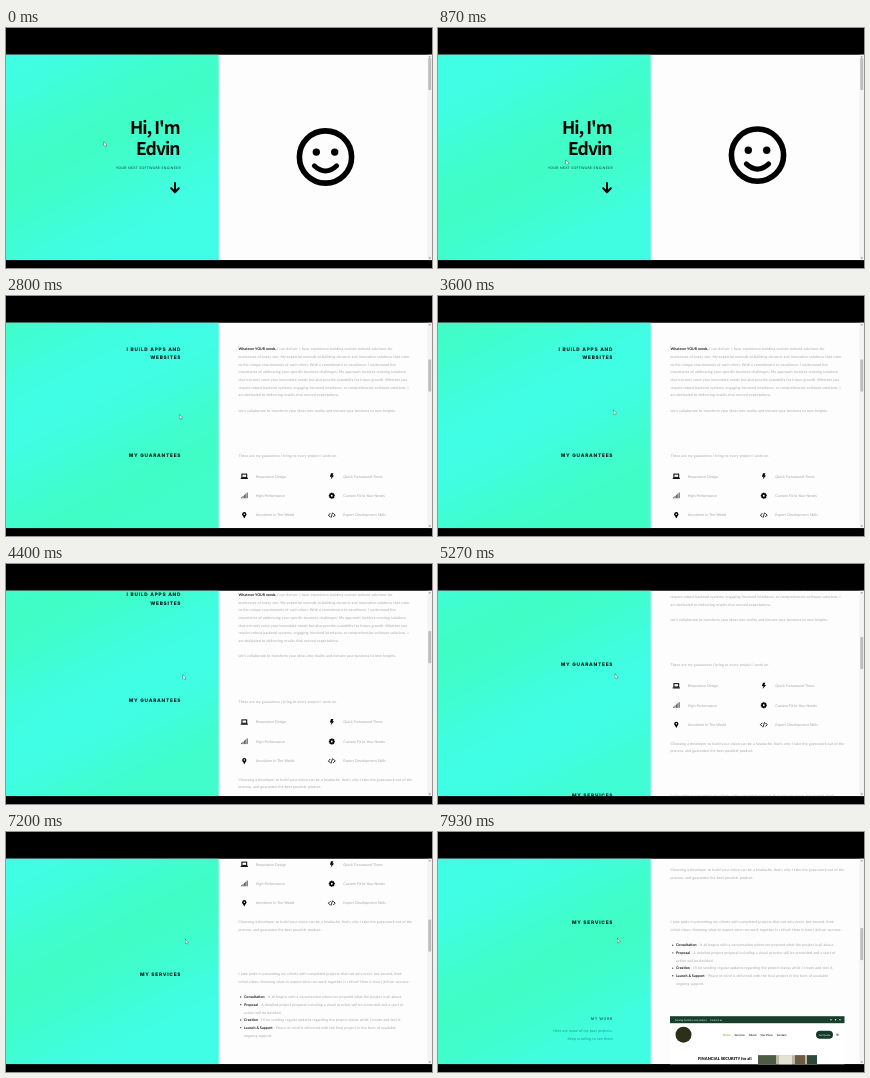
An HTML page with a canvas that plays this animation: 426 by 240 pixels, repeating every 8 s.

```html
<!DOCTYPE html>
<html lang="en">
<head>
<meta charset="utf-8">
<title>Portfolio scroll</title>
<style>
  html, body { margin: 0; width: 100%; height: 100%; overflow: hidden; background: #000; }
  canvas { display: block; width: 426px; height: 240px; }
</style>
</head>
<body>
<canvas id="stage"></canvas>
<script>
const W = 426, H = 240, LOOP = 8000;
const TOP = 26.5, BOTTOM = 232.2, PAGE = BOTTOM - TOP, SPLIT = 212.7;
const NOTCH = 22.2;
const TITLE = '"Noto Sans CJK JP", "Noto Sans CJK SC", "Noto Sans CJK", "Open Sans", sans-serif';
const HEAD = 'Inter, sans-serif';
const BODY = 'Lato, sans-serif';
const INK = '#000', GREY = '#a6a6ac', PAPER = '#fdfdfd';

const canvas = document.getElementById('stage');
const ctx = canvas.getContext('2d');
const ratio = window.devicePixelRatio || 1;
canvas.width = W * ratio;
canvas.height = H * ratio;

const clamp = v => Math.min(1, Math.max(0, v));
const progress = (t, start, length) => clamp((t - start) / length);
const easeOut = p => 1 - (1 - p) * (1 - p);
const smooth = p => p * p * (3 - 2 * p);

// Start times of the wheel notches.
const wheel = [3900, 4800, 5200, 5700, 6430, 6800, 7125, 7390, 7650];

function scrollAt(t) {
  const jump = smooth(progress(t, 1900, 750)) * PAGE;
  return wheel.reduce((sum, start) => sum + NOTCH * easeOut(progress(t, start, 180)), jump);
}

// Time, x, y of the pointer.
const pointerPath = [
  [0, 98, 114], [400, 98, 114], [1450, 168.5, 157], [2000, 168.5, 157],
  [2700, 173.5, 119], [4300, 177, 111], [6130, 177.5, 109.5], [7200, 179.5, 107.5], [8000, 179.5, 106.5]
];

function pointerAt(t) {
  const i = pointerPath.findIndex(k => k[0] > t);
  const [t0, x0, y0] = pointerPath[i - 1], [t1, x1, y1] = pointerPath[i];
  const p = smooth((t - t0) / (t1 - t0));
  return [x0 + (x1 - x0) * p, y0 + (y1 - y0) * p];
}

// Writes text centred vertically on y and returns its width.
function write(str, x, y, size, { font = BODY, weight = 400, color = GREY, align = 'left', gap = 0 } = {}) {
  ctx.font = `${weight} ${size}px ${font}`;
  ctx.letterSpacing = gap + 'px';
  ctx.textRendering = 'geometricPrecision';
  ctx.textAlign = align;
  ctx.fillStyle = color;
  ctx.fillText(str, align === 'right' ? x + gap : x, y + size * 0.35);
  return ctx.measureText(str).width;
}

function box(x, y, w, h, color) {
  ctx.fillStyle = color;
  ctx.fillRect(x, y, w, h);
}

function disc(x, y, r, color) {
  ctx.fillStyle = color;
  ctx.beginPath();
  ctx.arc(x, y, r, 0, Math.PI * 2);
  ctx.fill();
}

function line(points, width, color = INK) {
  ctx.strokeStyle = color;
  ctx.lineWidth = width;
  ctx.lineCap = ctx.lineJoin = 'round';
  ctx.beginPath();
  points.forEach(([x, y]) => ctx.lineTo(x, y));
  ctx.stroke();
}

function shape(points, color = INK) {
  ctx.fillStyle = color;
  ctx.beginPath();
  points.forEach(([x, y]) => ctx.lineTo(x, y));
  ctx.fill();
}

function at(x, y, draw) {
  ctx.save();
  ctx.translate(x, y);
  draw();
  ctx.restore();
}

function panels(t) {
  const wash = ctx.createLinearGradient(0, TOP, SPLIT * 0.5, BOTTOM);
  for (let i = 0; i <= 8; i++) {
    const k = Math.cos(Math.PI * 2 * (i / 8 - t / 7000));
    wash.addColorStop(i / 8, `rgb(64, 253, ${Math.round(214 + 16 * k)})`);
  }
  box(0, TOP, W, PAGE, PAPER);
  box(0, TOP, SPLIT, PAGE, wash);
}

function face(t) {
  at(319.5, 127 + 2 * Math.cos(t / 3600 * Math.PI * 2), () => {
    ctx.strokeStyle = INK;
    ctx.lineCap = 'round';
    ctx.lineWidth = 5.6;
    ctx.beginPath();
    ctx.arc(0, 0, 26.1, 0, Math.PI * 2);
    ctx.stroke();
    disc(-9.2, -4.9, 3.7, INK);
    disc(9.2, -4.9, 3.7, INK);
    ctx.lineWidth = 4.9;
    ctx.beginPath();
    ctx.moveTo(-11.2, 8.8);
    ctx.quadraticCurveTo(0, 19.2, 11.2, 8.8);
    ctx.stroke();
  });
}

function hero(t) {
  const style = { font: TITLE, weight: 700, color: INK, align: 'right', gap: -1 };
  write("Hi, I'm", 174.5, 99.6, 17.5, style);
  write('Edvin', 174.5, 120.6, 17.5, style);
  write('YOUR NEXT SOFTWARE ENGINEER', 174.5, 140, 3.4, { color: '#123a35', align: 'right', gap: 0.35 });
  line([[169, 155], [169, 164]], 2);
  line([[165.2, 160.3], [169, 164.2], [172.8, 160.3]], 2);
  face(t);
}

const icons = {
  laptop() {
    ctx.strokeStyle = INK;
    ctx.lineWidth = 1;
    ctx.strokeRect(-2.4, -2.2, 4.8, 3.3);
    box(-3.6, 1.5, 7.2, 1.1, INK);
  },
  bolt() {
    shape([[-0.8, -3], [1.6, -3], [0.7, -0.8], [2.3, -0.8], [-1.1, 3.2], [-0.3, 0.4], [-1.9, 0.4]]);
  },
  bars() {
    for (let i = 0; i < 5; i++) box(-3.2 + i * 1.4, 2.6 - (i + 1) * 1.15, 1, (i + 1) * 1.15, '#55555a');
  },
  gear() {
    for (let i = 0; i < 4; i++) {
      ctx.rotate(Math.PI / 4);
      box(-0.8, -3, 1.6, 6, INK);
    }
    disc(0, 0, 2.3, INK);
    disc(0, 0, 0.95, PAPER);
  },
  pin() {
    disc(0, -0.9, 2.1, INK);
    shape([[-2, -0.4], [2, -0.4], [0, 3.3]]);
    disc(0, -0.9, 0.75, PAPER);
  },
  code() {
    line([[-1.8, -1.6], [-3.4, 0], [-1.8, 1.6]], 0.9);
    line([[1.8, -1.6], [3.4, 0], [1.8, 1.6]], 0.9);
    line([[0.7, -2.3], [-0.7, 2.3]], 0.8);
  }
};

const perks = [
  ['laptop', 'Responsive Design'], ['bolt', 'Quick Turnaround Times'],
  ['bars', 'High Performance'], ['gear', 'Custom Fit to Your Needs'],
  ['pin', 'Anywhere In The World'], ['code', 'Expert Development Skills']
];

const pitch = 7.65;
const paragraphs = [
  [60.7, [
    'businesses of every size. My expertise extends to building dynamic and innovative solutions that cater',
    'to the unique requirements of each client. With a commitment to excellence, I understand the',
    'importance of addressing your specific business challenges. My approach involves creating solutions',
    'that not only solve your immediate needs but also provide scalability for future growth. Whether you',
    'require robust backend systems, engaging frontend interfaces, or comprehensive software solutions, I',
    'am dedicated to delivering results that exceed expectations.', '',
    "Let's collaborate to transform your ideas into reality and elevate your business to new heights."
  ]],
  [159.5, ['These are my guarantees I bring to every project I work on.']],
  [237.7, [
    "Choosing a developer to build your vision can be a headache, that's why I take the guesswork out of the",
    'process, and guarantee the best possible product.'
  ]],
  [290, [
    'I take pride in presenting my clients with completed projects that not only meet, but exceed, their',
    'initial vision. Knowing what to expect when we work together is critical! Here is how I deliver success:'
  ]]
];

// Row, bold lead, text; rows without a lead continue the one above.
const steps = [
  [0, 'Consultation', ' - It all begins with a conversation where we pinpoint what the project is all about.'],
  [1, 'Proposal', ' - A detailed project proposal including a visual preview will be presented and a start of'],
  [2, '', 'action will be decided.'],
  [3, 'Creation', " - I'll be sending regular updates regarding the project status while I create and test it."],
  [4, 'Launch & Support', ' - Peace of mind is delivered with the final project in the form of available'],
  [5, '', 'ongoing support.']
];

const prose = (str, x, y) => write(str, x, y, 3.6, { gap: 0.11 });

function lead(bold, rest, x, y) {
  const w = bold ? write(bold, x, y, 3.6, { weight: 700, color: '#18181a' }) : 0;
  prose(rest, x + w, y);
}

function heading(str, y) {
  write(str, 174.5, y, 4.8, { font: HEAD, weight: 800, color: '#031210', align: 'right', gap: 0.75 });
}

function sections(t) {
  heading('I BUILD APPS AND', 53);
  heading('WEBSITES', 61.7);
  heading('MY GUARANTEES', 159);
  heading('MY SERVICES', 290);

  ctx.globalAlpha = progress(t, 7450, 800);
  write('MY WORK', 174.5, 386.8, 3.7, { font: HEAD, weight: 700, color: '#08221e', align: 'right', gap: 0.5 });
  const note = { color: '#174f47', align: 'right', gap: 0.1 };
  write('Here are some of my past projects.', 174.5, 399, 3.7, note);
  write('Keep scrolling to see them', 174.5, 406.8, 3.7, note);
  ctx.globalAlpha = 1;

  lead('Whatever YOUR needs,', ' I can deliver. I have experience building custom tailored solutions for', 232.5, 53);
  for (const [y, rows] of paragraphs) {
    rows.forEach((row, i) => prose(row, 232.5, y + i * pitch));
  }
  perks.forEach(([icon, label], i) => {
    const x = 238.3 + (i % 2) * 87.5, y = 180.3 + Math.floor(i / 2) * 19.4;
    at(x, y, icons[icon]);
    write(label, x + 11.5, y, 3.7);
  });
  for (const [row, bold, rest] of steps) {
    const y = 313 + row * pitch;
    if (bold) disc(234.7, y, 0.7, '#444');
    lead(bold, rest, 238, y);
  }
  sample();
}

function sample() {
  at(232, 384, () => {
    box(0, 0, 174.5, 60, '#ffffff');
    box(0, 0, 174.5, 7, '#183f2b');
    write('Serving families everywhere', 5, 3.5, 2.6, { color: '#e6eee8' });
    write('Contact us', 40, 3.5, 2.6, { color: '#e6eee8' });
    for (let i = 0; i < 3; i++) disc(161 + i * 4.5, 3.5, 0.7, '#e6eee8');
    disc(13.5, 18.5, 8, '#2b3019');
    ['Home', 'Services', 'About', 'Our Plans', 'Contact'].reduce((x, name, i) =>
      x + 4 + write(name, x, 18.5, 2.8, { weight: 700, color: i ? '#333' : '#c99a3a' }), 53);
    ctx.fillStyle = '#14382a';
    ctx.beginPath();
    ctx.roundRect(146, 14.5, 17, 8, 4);
    ctx.fill();
    write('Get Quote', 154.5, 18.5, 2.5, { color: '#fff', align: 'center' });
    disc(167.5, 18.5, 1.3, '#8c918d');
    write('FINANCIAL SECURITY for all', 28, 42.3, 4.1, { weight: 900, color: '#151515' });
    box(88, 39, 59, 21, '#b9b6a2');
    box(88, 39, 18, 21, '#4c5d43');
    box(109, 39, 13, 21, '#e4e2d2');
    box(125, 39, 10, 21, '#6d5b42');
    box(137, 39, 10, 21, '#2d4a36');
  });
}

function scrollbar(scroll) {
  box(421.5, TOP, 4.5, PAGE, '#f3f3f3');
  box(422.3, 30 + scroll * 0.163, 2.9, 32, '#bdbdbd');
  shape([[422.5, 29.2], [423.75, 27.8], [425, 29.2]], '#8a8a8a');
  shape([[422.5, 229.5], [423.75, 231], [425, 229.5]], '#8a8a8a');
}

function pointer(t) {
  const [x, y] = pointerAt(t);
  const hand = t > 1350 && t < 2100;
  const outline = hand
    ? [[0.6, 0], [1.5, 0], [1.6, 2], [3.5, 2.6], [3.5, 4.6], [2.8, 6], [0.8, 6], [-0.8, 3.6], [0.5, 3.6], [0.6, 0]]
    : [[0, 0], [0, 4], [0.9, 3.2], [1.6, 4.6], [2.2, 4.3], [1.6, 3], [2.8, 3], [0, 0]];
  at(x, y, () => {
    line(outline, 0.6, '#333');
    shape(outline, '#fff');
  });
}

function draw(t) {
  const scroll = scrollAt(t);
  ctx.setTransform(ratio, 0, 0, ratio, 0, 0);
  box(0, 0, W, H, '#000');
  ctx.save();
  ctx.beginPath();
  ctx.rect(0, TOP, W, PAGE);
  ctx.clip();
  panels(t);
  if (scroll < PAGE) at(0, -scroll, () => hero(t));
  if (scroll > 0) at(0, PAGE - scroll, () => sections(t));
  scrollbar(scroll);
  if (t > 1400 && t < 2300) {
    box(0, 226, 36, 6, '#36383c');
    write('example.com/#main', 2, 229, 3.3, { color: '#b9bcc2' });
  }
  pointer(t);
  ctx.restore();
}

const begin = performance.now();
function tick() {
  draw((performance.now() - begin) % LOOP);
  requestAnimationFrame(tick);
}
tick();
</script>
</body>
</html>
```
